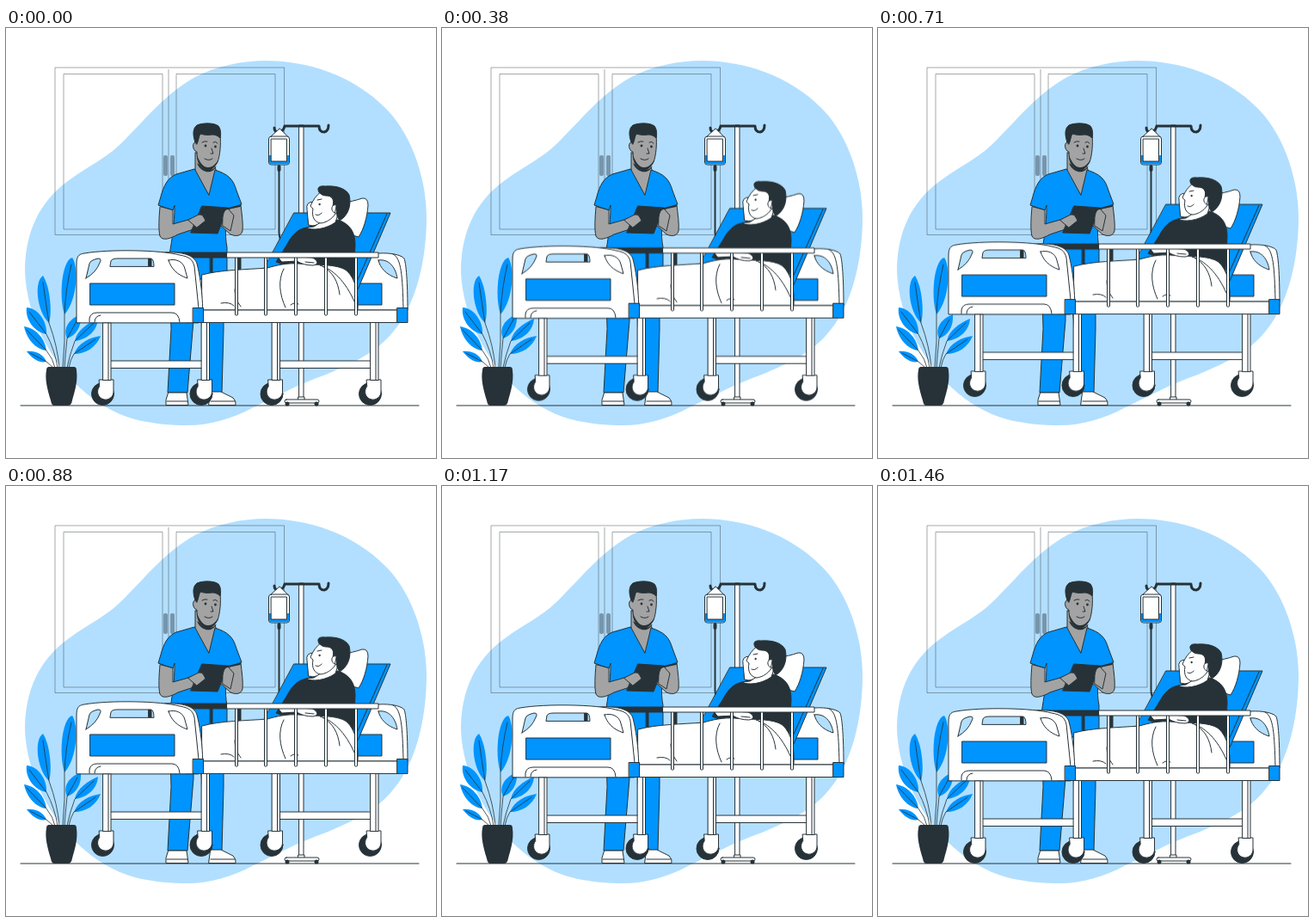
Animation of 500 by 500 pixels, one loop 1500 ms. Source, as an HTML page:

```html
<!DOCTYPE html>
<html lang="en">
<head>
<meta charset="utf-8">
<title>Hospital bed</title>
<style>
  html, body { margin: 0; width: 100%; height: 100%; overflow: hidden; background: #fff; }
  svg { display: block; width: 100vw; height: 100vh; }
  .ink { stroke: #263238; stroke-width: 1; stroke-linejoin: round; stroke-linecap: round; }
  .white { fill: #fff; }
  .blue { fill: #0094ff; }
  .dark { fill: #263238; }
  .skin { fill: #a3a3a3; }
  .line { fill: none; }
</style>
</head>
<body>
<svg viewBox="0 0 500 500">
  <path fill="#b2dfff" d="M302 38C352 38 404 56 440 92C468 118 489 170 489 220C489 270 477 325 446 358C426 380 400 391 372 403C338 415 315 428 288 441C262 455 235 462 212 462C190 462 174 460 158 457C110 447 70 410 48 370C30 338 22 305 22 280C23 235 40 203 68 181C95 160 118 152 140 128C165 103 185 77 220 57C245 44 275 38 302 38Z"/>

  <!-- window -->
  <g fill="none" stroke="#263238" stroke-opacity=".42">
    <path d="M57 46H323.500V240.500H57ZM189 48V240.500M67 53.500H182V234H67ZM198 53.500H313V234H198Z"/>
  </g>
  <g fill="#263238" fill-opacity=".42">
    <rect x="183" y="148" width="5" height="24" rx="2"/>
    <rect x="191" y="148" width="5" height="24" rx="2"/>
  </g>

  <path class="ink line" d="M17 439H480"/>

  <!-- plant -->
  <g class="ink blue" id="leaves"></g>
  <path class="dark" d="M50 394H79Q82 394 82 398C84 412 79 425 77 433Q76 439 72 439H56Q53 439 52 433C48 420 45 408 47 398Q47 394 50 394Z"/>

  <!-- drip stand -->
  <g class="ink white">
    <rect x="341" y="113" width="5" height="319"/>
    <rect x="340" y="429" width="7" height="4"/>
    <rect x="324" y="432" width="40" height="4" rx="2"/>
    <path class="line" style="stroke-width:3" d="M312 116Q312 121 317 121Q323 120 324 114H364Q364 121 370 121Q375 120 375 113"/>
    <path d="M318 117L307 127H328Z"/>
    <rect x="305.500" y="126" width="24" height="33" rx="3"/>
    <path class="blue" stroke="none" d="M306 148H329V156Q329 158.500 327 158.500H308Q306 158.500 306 156Z"/>
    <rect x="308.500" y="129" width="18" height="26"/>
    <path class="line" style="stroke-width:4" d="M317.500 161V165"/>
    <path class="line" style="stroke-width:2" d="M317.500 165V238Q318 246 322 252"/>
  </g>
  <g class="dark"><circle cx="327" cy="437" r="2.500"/><circle cx="361" cy="437" r="2.500"/></g>

  <!-- nurse -->
  <g class="ink">
    <path class="blue" d="M191 300H218V340L211 424H188L192 350ZM224 300H253V350L251 424H236Z"/>
    <path class="white" d="M189 424H210L212 438.500H186V433Z"/>
    <path class="white" d="M238 423H250L264 430Q268 434 267 438.500H236Z"/>
    <path class="line" d="M187 434H211M238 434H266"/>
    <path class="skin" d="M220 145V165L212 169L236 197L245 168L242 158Z"/>
    <path class="dark" stroke="none" d="M222 157C226 168 240 172 245 160C242 164 238 166 232 164Z"/>
    <path class="blue" d="M219 164L198 170C188 174 183 184 180 196L177 206L194 212L196 206C196 230 193 245 190 264V292H257V255C254 240 256 225 257 211L274 205L268 189C264 175 258 170 243 165L236 194Z"/>
    <path class="skin" d="M179 208C178 220 177 234 179 242C182 248 191 245 200 240L224 232L232 224L226 217L212 223L194 228L194 212Z"/>
    <path class="skin" d="M257 211L273 206C274 215 276 228 275 236C273 243 266 242 261 240L249 229V212L257 213L260 217Z"/>
    <path class="dark" d="M228 207L258 209L246 239L215 238Z"/>
    <path class="skin" d="M212 223L224 217Q228 216 230 220L232 224L222 232Z"/>
    <path class="skin" d="M252 220Q253 211 258 210L265 218L261 236L252 230Z"/>
    <path class="line" style="stroke-width:2" d="M253 211L272 207"/>
    <path class="skin" d="M222 132C215 132 217 143 222 144C222 155 225 161 230 164C236 167 243 162 246 156C249 148 250 135 249 124L226 122Z"/>
    <path class="dark" stroke="none" d="M222 148C223 157 227 164 234 166C240 166 245 159 247 153C242 161 239 162 234 162C228 161 225 155 222 148Z"/>
    <path class="dark" d="M220 133C217 124 217 117 222 113C229 110 242 110 247 114C250 118 250 123 249 128C246 125 243 124 240 124C234 125 229 124 226 123C224 126 224 131 222 135Z"/>
    <path class="line" d="M228 133Q231 131 234 132M241 133Q244 131 246 134M239 140L241 146H238M231 152Q236 155 240 152"/>
    <g class="dark" stroke="none"><circle cx="232" cy="137" r="1.400"/><circle cx="243.500" cy="138" r="1.400"/></g>
  </g>

  <!-- bed and patient -->
  <g id="bed" class="ink">
    <path class="dark" d="M165 261H257V267H165ZM166 267H169V290H166ZM237.500 267H240V290H237.500ZM271 267H273V290H271Z"/>
    <path class="white" fill-rule="evenodd" d="M405 264L433 262C447 261 460 264 463 268C466 276 467 305 467 328H405ZM433 270C445 268 453 278 455 291C442 287 435 279 433 270Z"/>
    <path class="line" d="M450 263C460 267 461 290 462 326"/>
    <path class="blue" d="M405 297H437V322H405Z"/>
    <path class="blue" d="M335 215H447L409 304L300 280Z"/>
    <path class="line" d="M443 216L407 297"/>
    <path class="white" d="M350 211Q348 202 358 202C380 206 400 203 414 198Q421 197 421 206C420 220 416 234 410 243L396 239L352 229Z"/>
    <path class="dark" d="M349 232C339 234 333 240 326 253L314 272L345 284L404 292L406 252C406 237 400 228 386 223Z"/>
    <path class="white" d="M372 222L358 231L349 232C356 236 372 234 383 226L387 214Z"/>
    <path class="white" d="M367 190C361 194 357 200 354 207Q355 209 357 210C355 220 359 226 366 227C373 226 379 222 383 216L392 205L385 190Z"/>
    <path class="dark" d="M364 191C361 186 364 183 371 184C383 183 395 186 399 194C402 206 398 218 388 224L385 219L384 208L380 207C382 199 379 195 372 195C368 195 366 193 364 191Z"/>
    <path class="white" d="M384 206C378 204 377 213 382 215Z"/>
    <path class="line" d="M362 200L367 199M360 217Q364 219 367 215"/>
    <circle class="dark" cx="364.500" cy="205" r=".7"/>
    <path class="white" d="M228 287C250 281 278 281 304 279C314 276 327 273 340 274C362 276 385 274 396 282C407 292 410 310 409 328H228Z"/>
    <path class="white" d="M317 267L324 265L356 267C363 270 364 275 357 276C349 276 343 274 338 271L321 272Z"/>
    <path class="line" d="M323 280C316 293 318 310 325 325M365 276C380 280 395 295 405 318M368 277C380 284 386 294 388 310M266 304Q266 315 273 324M331 322Q336 318 340 321M250 320Q260 318 265 323M348 272L358 273"/>

    <rect class="white" x="228" y="328" width="238" height="14.500"/>
    <g id="posts" class="white"></g>
    <rect class="white" x="257" y="261" width="176" height="6"/>

    <g class="white">
      <path d="M117 387H230V395.500H117ZM314 387H428V395.500H314Z"/>
      <g id="legs"></g>
    </g>

    <path class="white" d="M185 261C205 260 219 264 222 274C226 290 229 310 229 342.500H210Z"/>
    <path class="white" fill-rule="evenodd" d="M82 342.500V275C82 266 84 263 91 262C120 257 180 258 202 264C213 266 217 269 219 277L224 326V342.500ZM93 291L97 274Q98 270 107 268Q112 268 109 273Q105 284 93 291ZM121 277L122 271Q123 268 130 268H168Q172 268 172 277ZM189 270C197 268 206 271 208 280L211 291C199 287 192 280 189 270Z"/>
    <path class="blue" d="M98 297H196V322H98Z"/>
    <path class="line" d="M97 342V338Q98 331 106 331H193Q201 331 202 342M103 342Q103 335 110 334"/>
    <rect class="blue" x="217.500" y="325.500" width="12" height="17"/>
    <rect class="blue" x="455" y="325.500" width="12" height="17"/>
  </g>
</svg>
<script>
  const put = (id, html) => document.getElementById(id).innerHTML = html;

  // Each leaf: outline, then its stem
  const leaves = [
    ["M68 333C61 312 65 270 77 267C84 276 84 315 68 333Z", "M76 275Q69 305 68 333Q69 365 66 395"],
    ["M50 343C36 330 32 295 43 288C51 300 54 330 50 343Z", "M43 296Q47 325 50 343Q60 370 62 395"],
    ["M47 356C34 354 22 340 24 325C38 326 48 342 47 356Z", "M27 330L47 356Q57 375 60 395"],
    ["M47 375C35 374 24 362 21 347C34 349 45 360 47 375Z", "M24 351L47 375Q55 385 57 395"],
    ["M47 388C38 390 30 384 24 376C34 375 43 379 47 388Z", "M28 378L47 388L55 395"],
    ["M71 361C66 350 72 339 87 333C88 347 82 357 71 361Z", "M83 339L71 361Q69 380 68 395"],
    ["M80 364C82 352 95 343 107 338C106 352 95 362 80 364Z", "M102 343L80 364Q74 380 71 395"],
    ["M79 379C84 366 97 360 110 358C105 371 93 379 79 379Z", "M104 362L79 379Q75 385 73 395"]
  ];
  put("leaves", leaves.map(([leaf, stem]) =>
    `<path stroke="none" d="${leaf}"/><path class="line" stroke-opacity=".8" d="${stem}"/>`).join(""));

  put("posts", [268, 302, 337, 372, 407].map(x =>
    `<rect x="${x - 1.5}" y="265" width="3" height="69" rx="1"/>`).join(""));

  put("legs", [117.5, 232, 314, 428.5].map(x => `
    <circle class="dark" cx="${x - 5}" cy="425.500" r="13"/>
    <path d="M${x - 9} 409H${x + 7.5}V422A9.300 9.300 0 1 1 ${x - 9} 417Z"/>
    <rect x="${x - 4.5}" y="342.500" width="9" height="67"/>
    <path class="line" d="M${x + 1.5} 343V409"/>`).join(""));

  document.getElementById("bed").animate([
    { transform: "translateY(0px)" },
    { transform: "translateY(-10.200px)", offset: 0.487 },
    { transform: "translateY(0px)", offset: 0.975 },
    { transform: "translateY(0px)" }
  ], { duration: 1500, iterations: Infinity });
</script>
</body>
</html>
```
